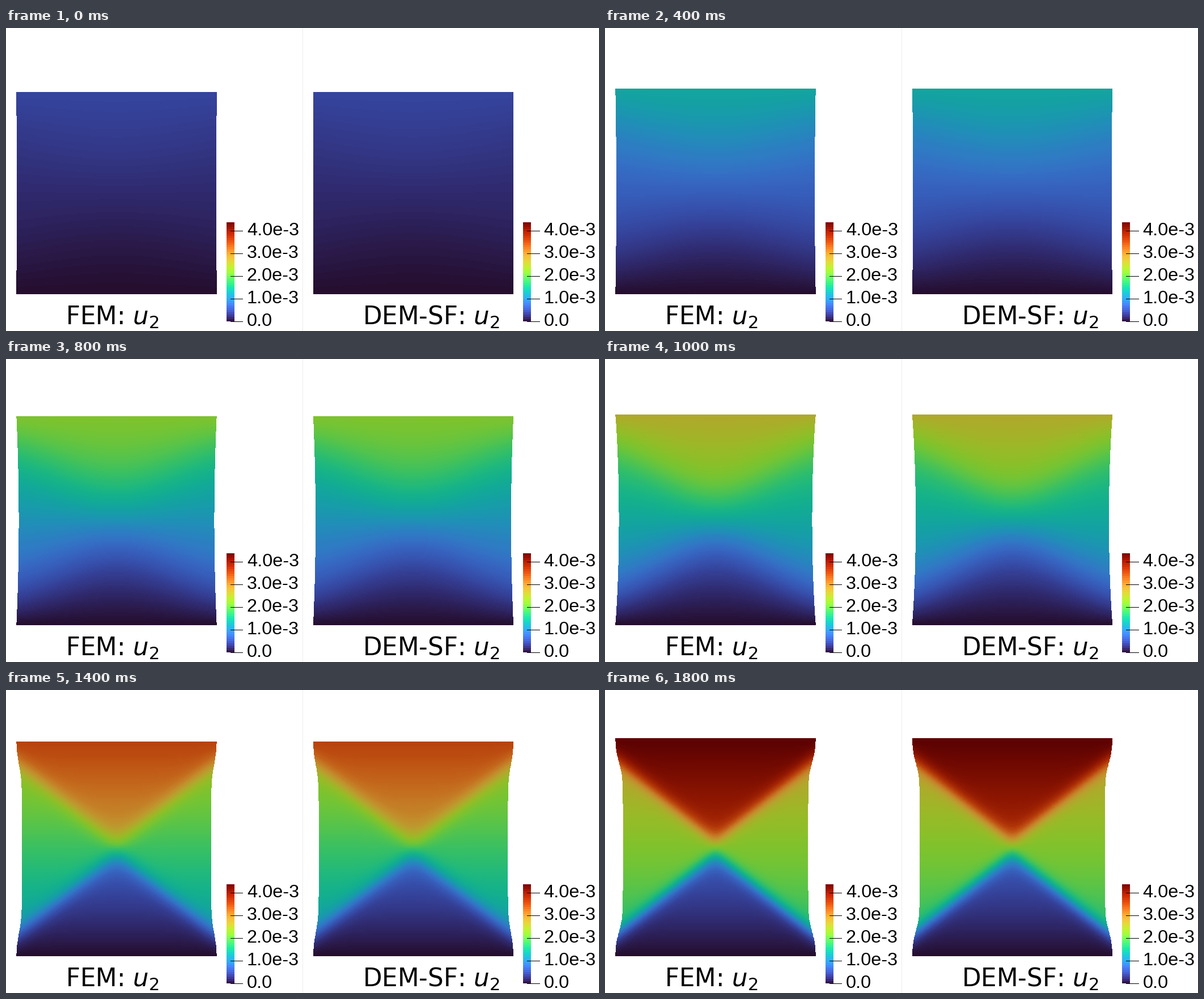
Recreate the animation shown at these times as a matplotlib script. Size 1046 by 535 pixels, loop 2 s.

```python
import numpy as np
import matplotlib.pyplot as plt
from matplotlib.animation import FuncAnimation
from matplotlib.colors import ListedColormap
from matplotlib.patches import Rectangle

W, H, DPI = 1046, 535, 128
PX = 72 / DPI               # points per pixel
STEPS, INTERVAL = 10, 200
PANEL = 523.5               # shift between the two panels
HALF = 176.7                # half side of the undeformed square
CX, CY = 195, 292.8         # its centre
LIFT = 3.1                  # upward pull of the top edge per step
SLOPE = 0.8                 # inclination of the shear bands

# Per load step: band width, share of slip, side contraction in pixels
BAND = [.75, .70, .65, .55, .45, .35, .20, .12, .105, .10]
SLIP = [.70, .70, .65, .60, .60, .60, .58, .60, .66, .70]
SQUEEZE = [.5, 1.0, 1.7, 2.7, 4.3, 6.3, 8.3, 10.2, 12.0, 13.5]

turbo = plt.get_cmap("turbo")
shaded = ListedColormap(turbo(np.arange(256))[:, :3] * 0.77)

fig = plt.figure(figsize=(W / DPI, H / DPI), dpi=DPI, facecolor="white")
ax = fig.add_axes([0, 0, 1, 1])
ax.set_xlim(0, W)
ax.set_ylim(H, 0)
ax.axis("off")
ax.set_autoscale_on(False)


def draw_legend(dx):
    x, top, bottom, n = 388.6 + dx, 343, 518, 44
    h = (bottom - top) / n
    for i in range(n):
        ax.add_patch(Rectangle((x, bottom - (i + 1) * h), 14, h, lw=0,
                               antialiased=False,
                               color=turbo((i + 0.5) / n)))
    for i in range(5):
        y = bottom - 40.1 * i
        ax.plot([x + 7, x + 28.5], [y, y], color="black", lw=PX)
        ax.text(x + 36.2, y + 8, f"{i}.0e-3" if i else "0.0",
                family="Liberation Sans", size=32.4 * PX, va="baseline")


def draw_title(x, text):
    ax.text(x, 524, text, family="DejaVu Sans", size=43.6 * PX,
            ha="center", va="baseline")


draw_legend(0)
draw_legend(PANEL)
draw_title(187.3, "FEM: $u_2$")
draw_title(750.2, "DEM-SF: $u_2$")
ax.plot([522.5, 522.5], [0, H], color="#ececec", lw=PX)

s, q = np.meshgrid(np.linspace(-1, 1, 181), np.linspace(-1, 1, 181))


def slip(a, b, w):
    """Smooth odd step in a that opens where |a| exceeds |b|."""
    r = np.hypot(b, w / 2)
    return (np.tanh((a - r) / w) + np.tanh((a + r) / w)) / 2


def deform(k):
    """Deformed mesh and vertical displacement (share of the full range)."""
    w, p = BAND[k], SLIP[k]
    load = (k + 1) / STEPS
    rigid = slip(q, SLOPE * s, w) / slip(np.ones_like(s), SLOPE * s, w)
    u = load * (1 + (1 - p) * q + p * rigid) / 2

    m = np.clip((k - 3) * 0.2, 0, 0.88)
    wedge = slip(SLOPE * s, q, w) * (1 - q ** 16)
    pull = SQUEEZE[k] * ((1 - m) * s * (1 - q * q) + m * wedge)
    x = CX + HALF * s - pull
    y = CY - HALF * q - LIFT * STEPS * u
    return x, y, u


meshes = []


def update(k):
    while meshes:
        meshes.pop().remove()
    x, y, u = deform(k)
    cells = (u[1:, 1:] + u[:-1, :-1] + u[1:, :-1] + u[:-1, 1:]) / 4
    for dx in (0, PANEL):
        meshes.append(ax.pcolormesh(x + dx, y, 1.01 * cells, cmap=shaded,
                                    vmin=0, vmax=1, antialiased=False))
    return meshes


anim = FuncAnimation(fig, update, frames=STEPS, init_func=lambda: meshes,
                     interval=INTERVAL, repeat=True, repeat_delay=0)
plt.show()
```
